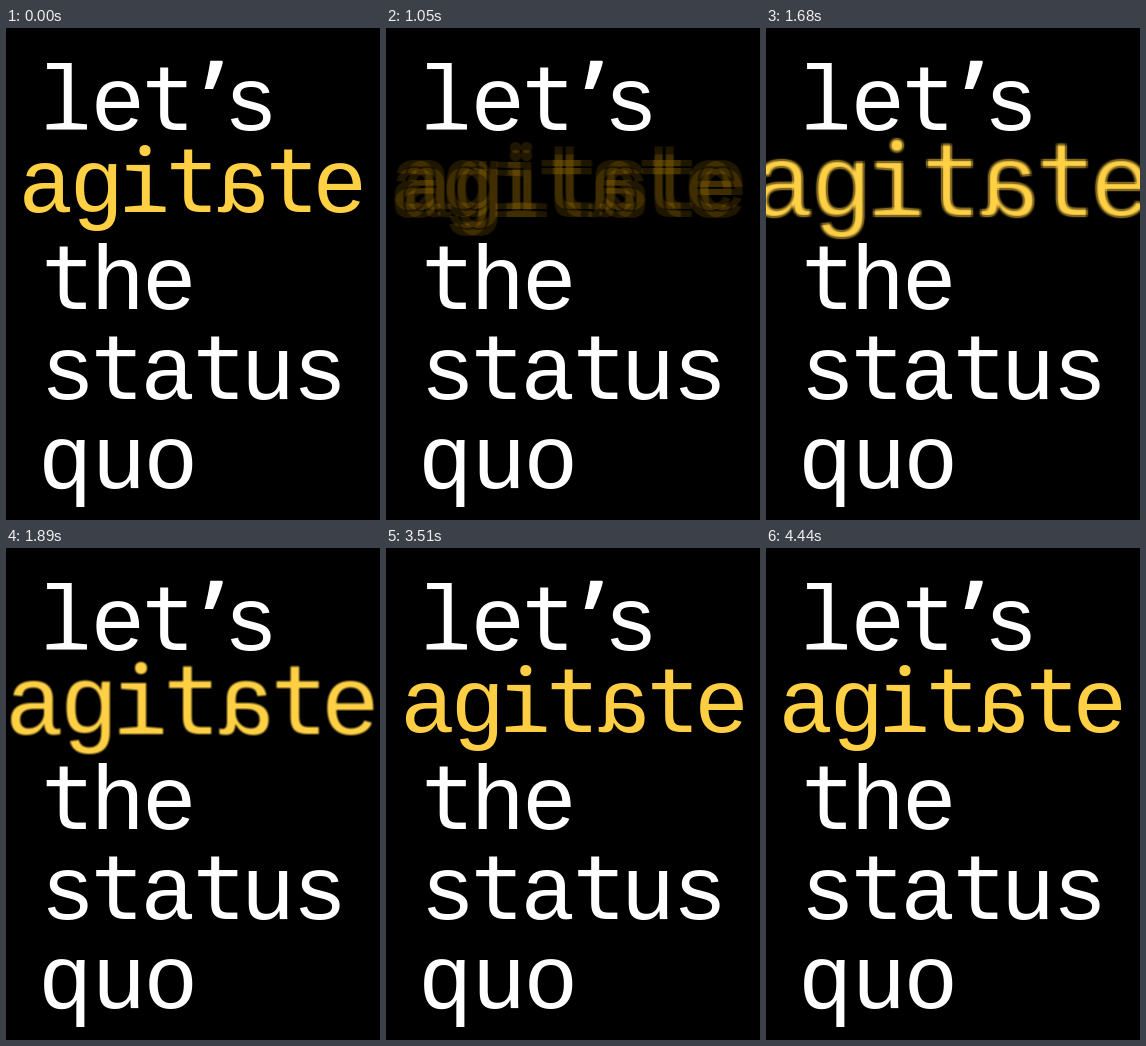
These frames come from a looping animation (374 px wide and 492 px high, 4.47 s). An HTML page with a canvas:

```html
<!DOCTYPE html>
<html lang="en">
<head>
<meta charset="utf-8">
<title>let’s agitate the status quo</title>
<style>
html, body { margin: 0; height: 100%; overflow: hidden; background: #000; }
canvas { display: block; }
</style>
</head>
<body>
<canvas id="stage" width="374" height="492"></canvas>
<script>
const LOOP = 4470, CENTER = 187, MIDDLE = 160, MARGIN = 20;
const stage = document.getElementById('stage');
const ctx = stage.getContext('2d');
const layer = document.createElement('canvas');
layer.width = stage.width + 2 * MARGIN;
layer.height = stage.height;
const word = layer.getContext('2d');

// Slab letters, the wide t and the quote come from other monospaced faces.
const MONO = '91px "Liberation Mono", monospace';
const SLAB = '88px "Noto Sans Mono", monospace';
const FACES = {
  l: SLAB,
  i: SLAB,
  t: '89px "DejaVu Sans Mono", monospace',
  '’': '115px "Noto Sans Mono", monospace'
};

// Draws one character with its ink centred on x.
function glyph(c, char, x, y) {
  c.font = FACES[char] || MONO;
  const m = c.measureText(char);
  c.fillText(char, x - (m.actualBoundingBoxRight - m.actualBoundingBoxLeft) / 2, y);
}

function line(text, y, centers) {
  [...text].forEach((char, i) => glyph(ctx, char, centers[i], y));
}

function drawStill() {
  ctx.fillStyle = '#000';
  ctx.fillRect(0, 0, stage.width, stage.height);
  ctx.fillStyle = '#fff';
  line('let', 102, [61, 111.5, 160.5]);
  glyph(ctx, '’', 208, 115);
  glyph(ctx, 's', 245, 102);
  line('the', 281, [60, 112, 163]);
  line('status', 371, [62, 109.5, 163, 211.5, 262, 314]);
  line('quo', 460, [58.5, 113, 164.5]);
}

// bend: sideways pull growing towards both ends, amber: colour shift,
// sx / sy: distance of the echoes
const REST = { dx: 0, dy: 0, scale: 1, bend: 0, alpha: 1, amber: 0, sx: 0, sy: 0 };
const SWING = { dx: -3, bend: -17, alpha: .86, amber: -.25 };
const KEYS = [
  { t: 0 }, { t: 570 },
  { t: 690, dx: 3, bend: 8, alpha: .95 },
  { t: 840, ...SWING },
  { t: 1050, dx: -4, dy: 1, alpha: .5, amber: 1, sx: 5.5, sy: 4 },
  { t: 1170, dx: 5, dy: -3, scale: 1.1, alpha: .6, amber: 1, sx: 6, sy: 3 },
  { t: 1320, dx: 4, dy: 1, alpha: 1, amber: 1, sx: 4, sy: 1.5 },
  { t: 1500, dx: -5, scale: 1.2, amber: .4, sx: 3, sy: 2 },
  { t: 1680, dx: -1, scale: 1.15, sx: 1.2, sy: 1.2 },
  { t: 2100 }, { t: 3480 },
  { t: 3600, dx: 3, bend: 8, alpha: .95 },
  { t: 3750, ...SWING },
  { t: 3990 }, { t: LOOP }
].map(key => ({ ...REST, ...key }));

function poseAt(t) {
  const i = KEYS.findIndex(key => key.t > t);
  const a = KEYS[i - 1], b = KEYS[i];
  const u = (t - a.t) / (b.t - a.t);
  const ease = u * u * (3 - 2 * u);
  const pose = {};
  for (const k in REST) pose[k] = a[k] + (b[k] - a[k]) * ease;
  return pose;
}

const LETTERS = [...'agitate'];
const OFFSETS = [41, 90, 139.5, 184.5, 235, 284.5, 333.5].map(x => x - CENTER);
const HALF = OFFSETS[6];

function drawWord({ dx, dy, scale, bend, alpha, amber, sx, sy }) {
  word.clearRect(0, 0, layer.width, layer.height);
  word.fillStyle = `rgb(255, ${208 - 30 * amber}, ${68 - 68 * amber})`;
  LETTERS.forEach((char, i) => {
    const x = OFFSETS[i];
    word.save();
    word.translate(MARGIN + CENTER + x * scale + dx + bend * (x / HALF) ** 2, MIDDLE + dy);
    word.scale(i === 4 ? -scale : scale, scale);
    glyph(word, char, 0, 24);
    word.restore();
  });

  ctx.save();
  if (sx < .05) {
    ctx.globalAlpha = alpha;
    ctx.drawImage(layer, -MARGIN, 0);
  } else {
    ctx.globalCompositeOperation = 'lighter';
    ctx.globalAlpha = alpha / 4;
    for (const h of [-1, 1])
      for (const v of [-1, 1])
        ctx.drawImage(layer, h * sx - MARGIN, v * sy);
  }
  ctx.restore();
}

function frame() {
  drawStill();
  drawWord(poseAt(performance.now() % LOOP));
  requestAnimationFrame(frame);
}
frame();
</script>
</body>
</html>
```
